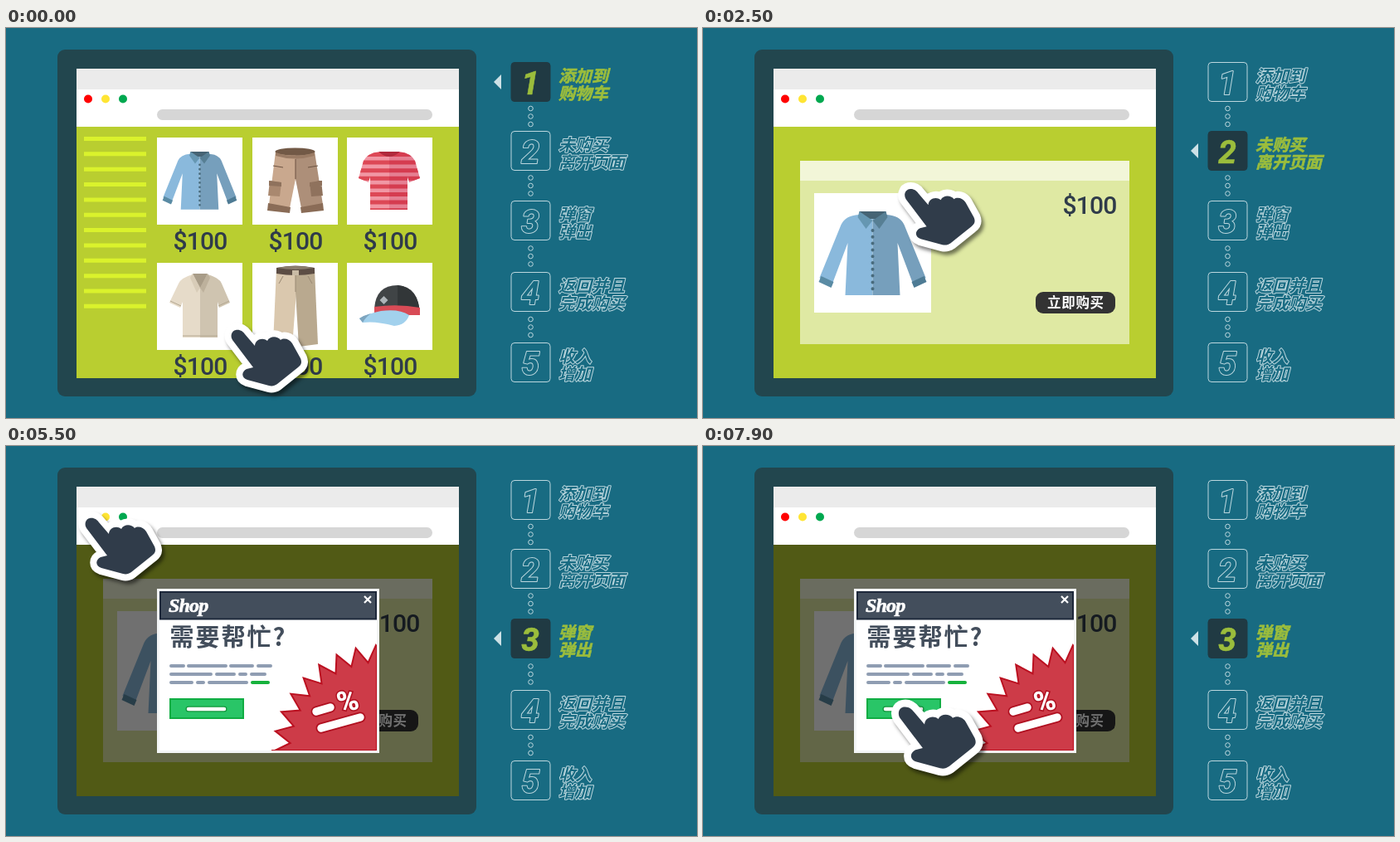
Animation, 833 px wide and 470 px high, one loop 8 s. Source, as an HTML page:

```html
<!DOCTYPE html>
<html lang="zh">
<head>
<meta charset="utf-8">
<title>购物车</title>
<style>
html, body { margin: 0; width: 100%; height: 100%; overflow: hidden; background: #186b82; }
svg { display: block; width: 833px; height: 470px; }
text { font-family: "Noto Sans CJK SC", "Noto Sans CJK", sans-serif; font-weight: 700; }
.price { font: 500 30px Roboto, sans-serif; letter-spacing: -.8px; fill: #2f3b4a; text-anchor: middle; }
.step rect, .step text, .dot { fill: #186b82; stroke: #bcd7de; stroke-width: 1; }
.step text { font-size: 20px; font-weight: 900; font-style: italic; paint-order: stroke; stroke-width: 2; stroke-linejoin: round; }
.step .num { font: italic 700 39px Roboto, sans-serif; text-anchor: middle; }
.step.on rect { fill: #203a43; stroke: #203a43; }
.step.on text { fill: #9bbd3c; stroke: #9bbd3c; stroke-width: .6; }
#hand { filter: drop-shadow(3px 4px 2px rgba(0, 0, 0, .5)); }
</style>
</head>
<body>
<svg viewBox="0 0 833 470">
  <defs>
    <g id="shirt">
      <path fill="#8ab9dc" d="M0 6L-17 4Q-33 5-38 16L-64 80L-50 91L-30 38L-33 101H0Z"/>
      <path fill="#769fbc" d="M0 6L17 4Q33 5 38 16L64 80L50 91L30 38L33 101H0Z"/>
      <path fill="#5a8ba4" d="M-62 78L-47 85L-50 92L-65 85Z"/>
      <path fill="#4e7b94" d="M62 78L47 85L50 92L65 85Z"/>
      <path fill="#466474" d="M-16 0H16V9H-16Z"/>
      <path fill="#6697b2" d="M-16 0L0 11L-8 21L-18 7Z"/>
      <path fill="#577f94" d="M16 0L0 11L8 21L18 7Z"/>
      <path stroke="#486b7d" stroke-width="4" stroke-linecap="round" stroke-dasharray="0 7.8" d="M0 23V100"/>
    </g>
    <clipPath id="teeCut"><path d="M449 149H475Q488 151 493 160L499 181L486 186L484 179V219H439V179L437 186L425 181L431 160Q436 151 449 149Z"/></clipPath>
    <clipPath id="popCut"><path d="M185 210H447V367H185Z"/></clipPath>
  </defs>

  <rect x="62" y="26" width="505" height="418" rx="9" fill="#22464e"/>
  <path fill="#fff" d="M85 49H546V119H85Z"/>
  <path fill="#ebebeb" d="M85 49H546V74H85Z"/>
  <circle cx="99" cy="85.5" r="5" fill="#f00"/>
  <circle cx="120" cy="85.5" r="5" fill="#ffe534"/>
  <circle cx="141" cy="85.5" r="5" fill="#00a84f"/>
  <rect x="182" y="98" width="332" height="13" rx="6.5" fill="#d6d6d6"/>
  <path fill="#b9ce30" d="M85 119H546V422H85Z"/>

  <g id="list">
    <g id="cards"></g>
    <use href="#shirt" transform="translate(233.5 149) scale(.69)"/>
    <g id="shorts">
      <path fill="#c9a88e" d="M325 149L317 213L342 217L349 182V149Z"/>
      <path fill="#ad8f79" d="M372 149L382 213L356 217L349 182V149Z"/>
      <path fill="#8a6c57" d="M316 211L343 216L342 223L315 220ZM382 211L355 216L356 223L383 220Z"/>
      <ellipse cx="348.5" cy="149" rx="24" ry="4.5" fill="#725946"/>
      <path fill="#9a7b64" d="M325 150Q348 158 372 150V154Q348 161 325 154Z"/>
      <path fill="#a9886f" d="M318 184L332 186L330 203L316 202Z"/>
      <path fill="#8f725d" d="M380 184L366 186L368 203L382 202ZM317 184L332 186V191L317 190ZM381 184L366 186V191L381 190Z"/>
      <path fill="none" stroke="#6c5342" d="M322 166L334 168M376 166L364 168M349 158V182"/>
    </g>
    <g clip-path="url(#teeCut)">
      <path fill="#f197a4" d="M425 149H499V220H425Z"/>
      <path stroke="#dd4856" stroke-width="74" stroke-dasharray="5 4.6" d="M462 150V220"/>
      <path fill="#a03" fill-opacity=".16" d="M462 149H499V220H462Z"/>
      <path fill="#b02a3c" d="M448 148H476Q462 162 448 148Z"/>
    </g>
    <g id="polo">
      <path fill="#e6dbc9" d="M225 297Q211 301 208 308L197 331L210 337L213 330V373H234V300Z"/>
      <path fill="#cfc4b0" d="M243 297Q257 301 260 308L270 331L257 337L255 330V373H234V300Z"/>
      <path fill="#a89c88" d="M225 296H243L234 314Z"/>
      <path fill="#d8ccb8" d="M225 296L234 313L230 319L222 301Z"/>
      <path fill="#bdb19c" d="M243 296L234 313L238 319L246 301Z"/>
      <path stroke="#b3a791" d="M213 371H255M198 329L211 335M269 329L256 335"/>
    </g>
    <g id="trousers">
      <path fill="#dac8ae" d="M326 290L322 381L345 384L350 318V290Z"/>
      <path fill="#b9a98f" d="M372 290L376 381L353 384L349 318V290Z"/>
      <path fill="#5c4d44" d="M326 289Q349 284 372 289V296Q349 300 326 296Z"/>
      <path fill="#8b7d6e" d="M327 289Q349 285 371 289Q349 293 327 289Z"/>
      <path fill="#c9bba5" d="M345 292H353V298H345Z"/>
      <path fill="none" stroke="#9a8a74" d="M349 298V318M334 299L329 308M364 299L369 308"/>
    </g>
    <g id="cap">
      <path fill="#404446" d="M444 338Q446 310 472 310Q498 312 499 346L444 342Z"/>
      <path fill="#323638" d="M472 310Q498 312 499 346H472Z"/>
      <path fill="#d84b56" d="M444 336Q472 332 499 337V346H444Z"/>
      <path fill="#a2d1ed" d="M426 350Q437 344 452 341Q474 338 486 346Q482 358 468 359Q446 353 430 355Z"/>
      <path fill="#7da5bf" d="M426 350Q432 346 440 344Q433 349 430 355Z"/>
      <path fill="#aeb4b8" d="M455.500 323L460.500 328L455.500 333L450.500 328Z"/>
    </g>
  </g>

  <g id="detail">
    <path fill="#b9ce30" d="M85 119H546V422H85Z"/>
    <path fill="#dfe9a3" d="M117 160H514V381H117Z"/>
    <path fill="#f2f6d8" d="M117 160H514V184H117Z"/>
    <path fill="#fff" d="M134 199H275V343H134Z"/>
    <use href="#shirt" transform="translate(204.5 221)"/>
    <text class="price" x="466" y="224">$100</text>
    <rect x="401" y="318" width="96" height="26" rx="9" fill="#333"/>
    <text x="415" y="337" font-size="16.500" letter-spacing=".7" fill="#fff">立即购买</text>
  </g>

  <g id="popup">
    <path fill-opacity=".56" d="M85 119H546V422H85Z"/>
    <path fill="#f3f5f6" d="M182 172H450V370H182Z"/>
    <path fill="#fff" d="M185 209H447V367H185Z"/>
    <path fill="#434e5c" stroke="#1d283a" stroke-width="2" d="M186 176H446V208.500H186Z"/>
    <text x="196" y="200" fill="#fff" stroke="#fff" stroke-width=".7" letter-spacing="-.8" style="font: italic 700 24px 'Liberation Serif', serif">Shop</text>
    <path stroke="#fff" stroke-width="2.200" d="M432 181L440 189M440 181L432 189"/>
    <text x="197.500" y="241" font-size="29" letter-spacing="2" fill="#434e5c">需要帮忙?</text>
    <path id="copy" stroke="#8f9db2" stroke-width="4" stroke-linecap="round"/>
    <path stroke="#16b23c" stroke-width="4" stroke-linecap="round" d="M297 285H316"/>
    <path fill="#29c567" stroke="#10ad43" stroke-width="2" d="M198 305H286V328H198Z"/>
    <g stroke-linecap="round">
      <path stroke="#10963a" stroke-width="7" d="M220 317H263"/>
      <path stroke="#fff" stroke-width="4.500" d="M220 317H263"/>
    </g>
    <g clip-path="url(#popCut)">
      <path id="burst" fill="#cd3b48" stroke="#bb1020" stroke-width="2"/>
      <path stroke="#bb1020" stroke-width="2" d="M447 240V367M320 367H447"/>
      <g stroke-linecap="round">
        <path stroke="#b01020" stroke-width="13" d="M374 320L391 315M380 340L427 327"/>
        <path stroke="#fff" stroke-width="9.500" d="M374 320L391 315M380 340L427 327"/>
      </g>
      <text transform="translate(402 322) rotate(-13)" fill="#fff" stroke="#b01020" stroke-width="3" paint-order="stroke" style="font: 900 35px Roboto, sans-serif">%</text>
    </g>
  </g>

  <g id="steps"></g>
  <path id="arrow" fill="#cde1e6" d="M588 0L597 -9V9Z"/>
  <g id="hand">
    <path fill="#303c4a" stroke="#fff" stroke-width="16" stroke-linejoin="round" paint-order="stroke"
      d="M9 19C6 14 8 8 13 7C18 6 22 9 24 12L36 26C36 19 45 15 51 20C54 14 63 14 67 19C71 16 78 18 81 23L91 41C93 46 92 49 88 52L63 72C60 74 57 75 53 74L27 67C19 64 20 57 26 54L34 52Z"/>
  </g>
</svg>
<script>
const $ = id => document.getElementById(id);
const LOOP = 8000, TICK = 100;

// Shop page: cards, prices, sidebar lines
let html = '';
for (const y of [132, 283])
  for (const x of [182, 297, 411])
    html += `<path fill="#fff" d="M${x} ${y}h103v105h-103z"/><text class="price" x="${x + 52}" y="${y + 135}">$100</text>`;
for (let i = 0; i < 12; i++)
  html += `<path stroke="#daf22c" stroke-width="5" d="M94 ${133.5 + i * 18.35}h75"/>`;
$('cards').innerHTML = html;

// Popup: text bars and starburst
const bars = [[265, 198, 215, 219, 266, 270, 298, 303, 320],
              [275, 198, 248, 253, 276, 281, 290, 295, 313],
              [285, 198, 225, 230, 239, 244, 291]];
let copy = '';
for (const [y, ...xs] of bars)
  for (let i = 0; i < xs.length; i += 2) copy += `M${xs[i] + 1} ${y}H${xs[i + 1] - 1}`;
$('copy').setAttribute('d', copy);

const spikes = [];
for (let i = -4; i < 22; i++) {
  const a = (92.7 + i * 5.4) * Math.PI / 180, r = i % 2 ? 110 : 130;
  spikes.push([452 + r * Math.cos(a), 370 - r * Math.sin(a)]);
}
$('burst').setAttribute('d', 'M' + spikes.join('L') + 'L452 370Z');

// Step list
const tops = [41, 124, 208, 294, 379];
const labels = ['添加到 购物车', '未购买 离开页面', '弹窗 弹出', '返回并且 完成购买', '收入 增加'];
$('steps').innerHTML = tops.map((y, i) => {
  const [a, b] = labels[i].split(' ');
  let s = `<g class="step"><rect x="609" y="${y + .5}" width="47" height="47" rx="4"/>
    <text class="num" x="632" y="${y + 38.5}">${i + 1}</text>
    <text x="666" y="${y + 23.5}">${a}</text><text x="666" y="${y + 45}">${b}</text></g>`;
  if (i < 4) {
    const mid = (y + 48 + tops[i + 1]) / 2;
    for (const d of [-9.5, 0, 9.5]) s += `<circle class="dot" cx="632.5" cy="${mid + d}" r="2.8"/>`;
  }
  return s;
}).join('');
const steps = document.querySelectorAll('.step');

// Pointer routes as [time, x, y]; at rest at both ends
const routes = [
  [[0, 264, 357], [200, 268, 333], [450, 258, 275], [700, 239, 224], [900, 227, 200], [1100, 223, 184], [1400, 223, 183]],
  [[2300, 223, 183], [2700, 256, 200], [2900, 270, 235], [3050, 255, 268], [3200, 228, 267],
   [3500, 168, 215], [3800, 118, 142], [4000, 96, 98], [4200, 88, 80]],
  [[5400, 88, 80], [5500, 88, 80], [5900, 150, 86], [6300, 256, 116], [6700, 345, 185], [7000, 377, 260], [7100, 386, 271],
   [7200, 391, 268], [7350, 375, 260], [7600, 262, 264], [7750, 206, 288], [7900, 232.5, 311]]
];

function slope(p, i, k) {
  const a = p[i - 1], b = p[i + 1];
  return a && b ? (b[k] - a[k]) / (b[0] - a[0]) : 0;
}

function pointer(t) {
  const p = routes.findLast(r => t >= r[0][0]);
  const i = p.findLastIndex(k => t >= k[0]);
  if (i === p.length - 1) return p[i].slice(1);
  const a = p[i], b = p[i + 1], d = b[0] - a[0], u = (t - a[0]) / d, v = 1 - u;
  return [1, 2].map(k =>
    (1 + 2 * u) * v * v * a[k] + u * u * (3 - 2 * u) * b[k] +
    d * u * v * (v * slope(p, i, k) - u * slope(p, i + 1, k)));
}

const ramp = (t, a, b) => Math.min(1, Math.max(0, (t - a) / (b - a)));
const pulse = (t, peak, size) => size * Math.max(0, 1 - Math.abs(t - peak) / 200);

function draw(t) {
  const [x, y] = pointer(t);
  const s = 1 + pulse(t, 1150, .06) + pulse(t, 4300, .06) + pulse(t, 7900, .1);
  $('hand').setAttribute('transform', `translate(${x + 50} ${y + 41}) scale(${s}) translate(-50 -41)`);
  $('detail').setAttribute('opacity', ramp(t, 1200, 1400));
  $('popup').setAttribute('opacity', ramp(t, 4300, 4500));
  const active = t < 1300 ? 0 : t < 5500 ? 1 : 2;
  steps.forEach((el, i) => el.classList.toggle('on', i === active));
  $('arrow').setAttribute('transform', `translate(0 ${tops[active] + 24})`);
}

const start = performance.now();
function frame() {
  const t = (performance.now() - start) % LOOP;
  draw(Math.floor(t / TICK) * TICK);
  requestAnimationFrame(frame);
}
frame();
</script>
</body>
</html>
```
